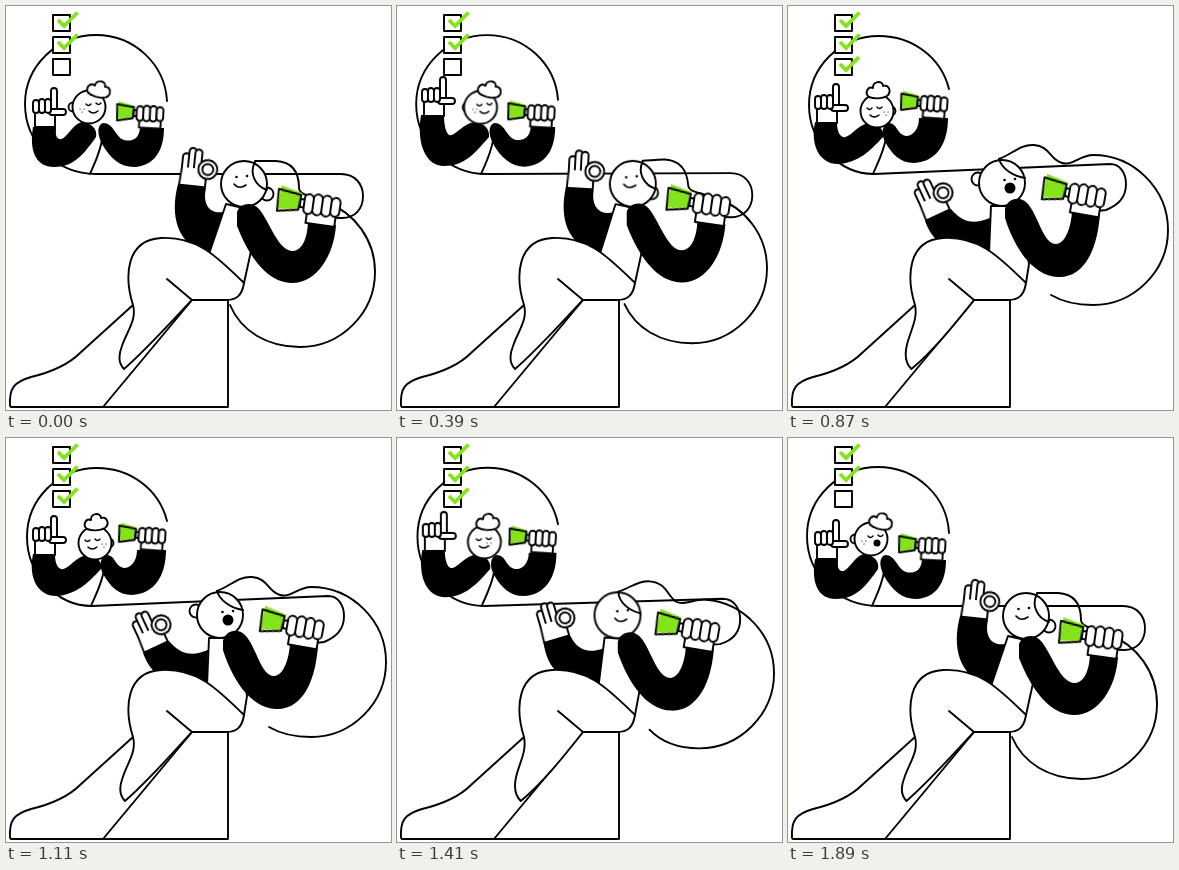
These frames come from a looping animation (385 px wide and 404 px high, 1920 ms). An HTML page:

```html
<!DOCTYPE html>
<html lang="en">
<head>
<meta charset="utf-8">
<title>Two friends talking</title>
<style>
  html, body { margin: 0; width: 100%; height: 100%; overflow: hidden; background: #fff; }
  svg { display: block; width: 385px; height: 404px; }

  path, circle, rect {
    fill: #fff; stroke: #000; stroke-width: 1.9;
    stroke-linecap: round; stroke-linejoin: round;
    vector-effect: non-scaling-stroke;
  }
  .line { fill: none; }
  .ink { fill: #000; stroke: none; }
  .lime { fill: #84e31a; stroke: none; }
  .tick { fill: none; stroke: #84e31a; stroke-width: 3.8; stroke-linecap: butt; stroke-linejoin: miter; }

  /* --a: upper friend speaks, --b: lower friend speaks, --c: raised hand */
  .morph, .move, .wave, .wave-hand { animation: 1920ms ease-in-out infinite; }
  .morph { d: var(--a); animation-name: morph; }
  .move { transform: var(--a); animation-name: move; }
  .wave { d: var(--a); animation-name: wave; }
  .wave-hand { transform: var(--a); animation-name: wave-hand; }
  .tap { d: var(--a); animation: tap 384ms ease-in-out infinite; }

  @keyframes morph {
    0%, 17.2%, 87.5%, 100% { d: var(--a); }
    32.3%, 65.6% { d: var(--b); }
  }
  @keyframes move {
    0%, 17.2%, 87.5%, 100% { transform: var(--a); }
    32.3%, 65.6% { transform: var(--b); }
  }
  @keyframes wave {
    0%, 98%, 100% { d: var(--a); }
    20.3%, 80% { d: var(--c); }
    32.3%, 65.6% { d: var(--b); }
  }
  @keyframes wave-hand {
    0%, 98%, 100% { transform: var(--a); }
    20.3%, 80% { transform: var(--c); }
    32.3%, 65.6% { transform: var(--b); }
  }
  @keyframes tap {
    0%, 100% { d: var(--a); }
    35%, 62% { d: var(--b); }
  }

  /* mouths switch hard between closed, wide and round */
  .mouth { animation: 1920ms step-end infinite; }
  .low.closed { animation-name: low-closed; }
  .low.wide { animation-name: low-wide; }
  .low.round { animation-name: low-round; }
  .up.closed { animation-name: up-closed; }
  .up.wide { animation-name: up-wide; }
  .up.round { animation-name: up-round; }
  @keyframes low-closed { 0%, 64.58% { opacity: 1; } 31.25% { opacity: 0; } }
  @keyframes low-wide { 0%, 39.58%, 56.25% { opacity: 0; } 31.25%, 47.92% { opacity: 1; } }
  @keyframes low-round { 0%, 47.92%, 64.58% { opacity: 0; } 39.58%, 56.25% { opacity: 1; } }
  @keyframes up-closed { 0% { opacity: 1; } 83.33% { opacity: 0; } }
  @keyframes up-wide { 0%, 91.67% { opacity: 0; } 83.33% { opacity: 1; } }
  @keyframes up-round { 0% { opacity: 0; } 91.67% { opacity: 1; } }

  #third { stroke-dasharray: 29; animation: draw 1920ms linear infinite; }
  @keyframes draw {
    0%, 38% { stroke-dashoffset: 29; }
    46%, 78% { stroke-dashoffset: 0; }
    78.01%, 100% { stroke-dashoffset: 29; }
  }
</style>
</head>
<body>
<svg viewBox="0 0 385 404">
  <defs>
    <g id="grip">
      <path d="M-14 6V19H15V6Z"/>
      <path class="lime" d="M-43 -15L-21 -10L-23 6L-44 9Z"/>
      <path class="line" d="M-45 -11L-22 -8L-23 7L-44 11Z"/>
      <path d="M-22 -4H-16V4H-22Z"/>
      <rect x="-18" y="-10" width="9" height="20" rx="4.5"/>
      <rect x="-9" y="-11" width="9" height="21" rx="4.5"/>
      <rect x="0" y="-11" width="9" height="21" rx="4.5"/>
      <rect x="9" y="-10" width="9" height="19" rx="4.5"/>
    </g>
    <path id="tick" class="tick" d="M52 14L58 20L71.500 6.500"/>
  </defs>

  <!-- speech line from the upper bubble -->
  <path class="line morph" style="
    --a:path('M161 95C159 58 128 29 90 29C51 29 19 60 19 98C19 137 51 168 90 168L335 168C349 168 357 178 357 190C357 203 349 212 336 212L305 211');
    --b:path('M161 83C153 51 124 30 91 30C52 30 21 61 21 99C21 135 50 168 86 168L322 158C332 158 338 167 338 178C338 192 330 199 318 204L300 206')"/>

  <!-- checklist -->
  <rect x="47" y="9" width="17" height="16"/>
  <rect x="47" y="31" width="17" height="16"/>
  <rect x="47" y="53" width="17" height="16"/>
  <use href="#tick"/>
  <use href="#tick" y="22"/>
  <path id="third" class="tick" d="M52 58L58 64L71.500 50.500"/>

  <!-- upper friend -->
  <path class="line morph" style="
    --a:path('M96 134C93 150 88 158 84 168');
    --b:path('M98 132C95 148 89 158 85 168')"/>
  <path class="ink wave" style="
    --a:path('M27 121C23 145 30 161 48 161C68 161 78 148 90 131C92 122 84 117 76 116C66 118 60 135 53 133C49 131 50 126 50 121Z');
    --b:path('M27 116C22 140 32 158 50 158C70 157 82 145 95 131C97 124 90 118 83 117C70 117 62 133 55 131C50 129 49 122 49 116Z');
    --c:path('M24 109C19 140 30 160 47 160C68 160 78 147 92 131C93 122 86 117 78 116C66 117 58 131 52 129C48 126 47 116 47 109Z')"/>
  <path class="ink morph" style="
    --a:path('M134 122C133 133 126 136 118 134C109 131 108 117 97 117C91 119 91 128 96 138C104 152 114 161 128 161C148 160 158 145 158 122Z');
    --b:path('M131 112C131 124 124 130 118 130C108 128 110 117 100 117C94 119 93 128 97 136C104 148 112 157 126 157C148 156 160 138 160 112Z')"/>
  <g class="wave-hand" style="--a:translate(38px,121px);--b:translate(38px,117px);--c:translate(36px,110px)">
    <path d="M-9 0V-18H11V0Z"/>
    <rect x="7" y="-39" width="6" height="27" rx="3"/>
    <rect x="5" y="-18" width="17" height="6" rx="3"/>
    <rect x="-11" y="-27" width="6" height="13" rx="3"/>
    <rect x="-5" y="-28" width="6" height="14" rx="3"/>
    <rect x="1" y="-28" width="6" height="14" rx="3"/>
  </g>
  <g class="move" style="--a:translate(144px,108px) rotate(3deg) scale(.74);--b:translate(146px,98px) rotate(4deg) scale(.74)">
    <use href="#grip"/>
  </g>
  <g class="move" style="--a:translate(67px,101px);--b:translate(103px,105px)">
    <circle r="4.500"/>
  </g>
  <g class="move" style="--a:translate(83px,101px);--b:translate(89px,105px)">
    <circle r="16.500"/>
  </g>
  <g class="move" style="--a:translate(93px,83px) rotate(18deg);--b:translate(90px,84px) rotate(0deg)">
    <path d="M-9 7C-14 3 -10 -4 -5 -2C-6 -9 5 -10 5 -4C11 -6 14 2 9 6C4 9 -4 9 -9 7Z"/>
  </g>
  <g class="move" style="--a:translate(87px,101px);--b:translate(86px,105px)">
    <path class="line" style="stroke-width:1.4" d="M-7 -3Q-4.500 0 -2 -3M3 -4Q5.500 -1 8 -4"/>
    <path class="line mouth up closed" style="stroke-width:1.5" d="M-4 4Q0 8 5 4"/>
    <path class="ink mouth up wide" d="M-4 2L6 1C6 7 4 9 2 9C-1 9 -3 6 -4 2Z"/>
    <circle class="ink mouth up round" cx="2" cy="4" r="3.500"/>
  </g>
  <g class="move" style="--a:translate(76px,105px);--b:translate(98px,108px)">
    <path class="line" style="stroke-width:1.2" d="M-2 -2h.1M2 -2h.1M0 1h.1"/>
  </g>

  <!-- ramp -->
  <path d="M4 400C3 382 8 376 25 371C50 365 64 357 74 347L127 299L186 294H222V401H5Z"/>
  <path class="line" d="M97 401L186 294"/>

  <!-- lower friend: hair flowing into the big ring -->
  <path class="line morph" style="
    --a:path('M249 155C257 155 263 155 270 155C288 156 293 168 293 182C293 190 312 192 320 196C349 207 369 234 369 266C369 307 335 341 294 341C261 341 235 325 224 299');
    --b:path('M211 153C225 148 232 138 246 139C262 140 262 154 274 157C285 160 292 149 305 149C346 149 380 183 380 224C380 265 346 299 305 299C289 299 275 296 263 289')"/>
  <path class="morph" style="
    --a:path('M220 198L203 248L238 277L247 236L250 205Z');
    --b:path('M203 200L201 248L238 277L241 258L232 200Z')"/>
  <path class="ink morph" style="
    --a:path('M172 178C164 208 170 240 203 247L217 206C205 208 196 200 200 182Z');
    --b:path('M137 215C146 238 158 246 201 247L202 212C185 219 174 216 163 203Z')"/>
  <g class="move" style="--a:translate(186px,180px) rotate(6deg);--b:translate(150px,209px) rotate(-25deg)">
    <rect x="-12" y="-32" width="7" height="26" rx="3.500"/>
    <rect x="-6" y="-38" width="7" height="30" rx="3.500"/>
    <rect x="0" y="-37" width="7" height="30" rx="3.500"/>
    <path style="stroke:none" d="M-12 0V-18H13V0Z"/>
    <path class="line" d="M-12 -18L-13 0H13V-9"/>
    <circle cx="14" cy="-18" r="9.500"/>
    <circle cx="14" cy="-18" r="5.500"/>
  </g>
  <path class="tap" style="
    --a:path('M127 299C118 270 120 234 155 232C192 230 212 252 238 277C236 290 230 294 220 294L186 294C164 317 140 344 118 363C112 357 112 350 116 340C121 325 131 314 127 299Z');
    --b:path('M127 299C118 270 120 234 155 232C192 230 212 252 238 277C236 290 230 294 220 294L186 294C168 317 146 345 124 363C118 357 117 350 119 340C122 325 130 314 127 299Z')"/>
  <path class="line" d="M161 273L186 294"/>

  <g class="move" style="--a:translate(261px,188px);--b:translate(190px,173px)">
    <circle r="6.500"/>
  </g>
  <g class="move" style="--a:translate(238px,178px);--b:translate(214px,177px)">
    <circle r="23"/>
  </g>
  <path class="line morph" style="
    --a:path('M249 156C243 167 249 180 261 184');
    --b:path('M211 153C214 163 225 170 237 172')"/>
  <g class="move" style="--a:translate(235px,175px);--b:translate(221px,178px)">
    <circle class="ink" cx="-4.500" cy="-4" r="1.300"/>
    <circle class="ink" cx="6" cy="-5" r="1.300"/>
    <path class="line mouth low closed" style="stroke-width:1.6" d="M-7 3Q-2 9 5 4"/>
    <path class="ink mouth low wide" d="M-5 2L7 -1C9 7 5 13 2 13C-2 13 -5 8 -5 2Z"/>
    <circle class="ink mouth low round" cx="1" cy="4" r="5.500"/>
  </g>

  <path class="ink morph" style="
    --a:path('M231 206C234 197 246 195 253 203C264 216 272 245 287 245C298 244 302 228 302 214L330 219C328 250 310 278 285 277C262 276 244 253 231 220Z');
    --b:path('M217 203C219 193 231 189 239 197C250 208 255 238 268 238C278 238 284 218 284 203L312 207C310 240 298 272 270 271C243 270 225 238 217 212Z')"/>
  <g class="move" style="--a:translate(316px,200px) rotate(8deg);--b:translate(299px,190px) rotate(10deg)">
    <use href="#grip"/>
  </g>
</svg>
</body>
</html>
```
